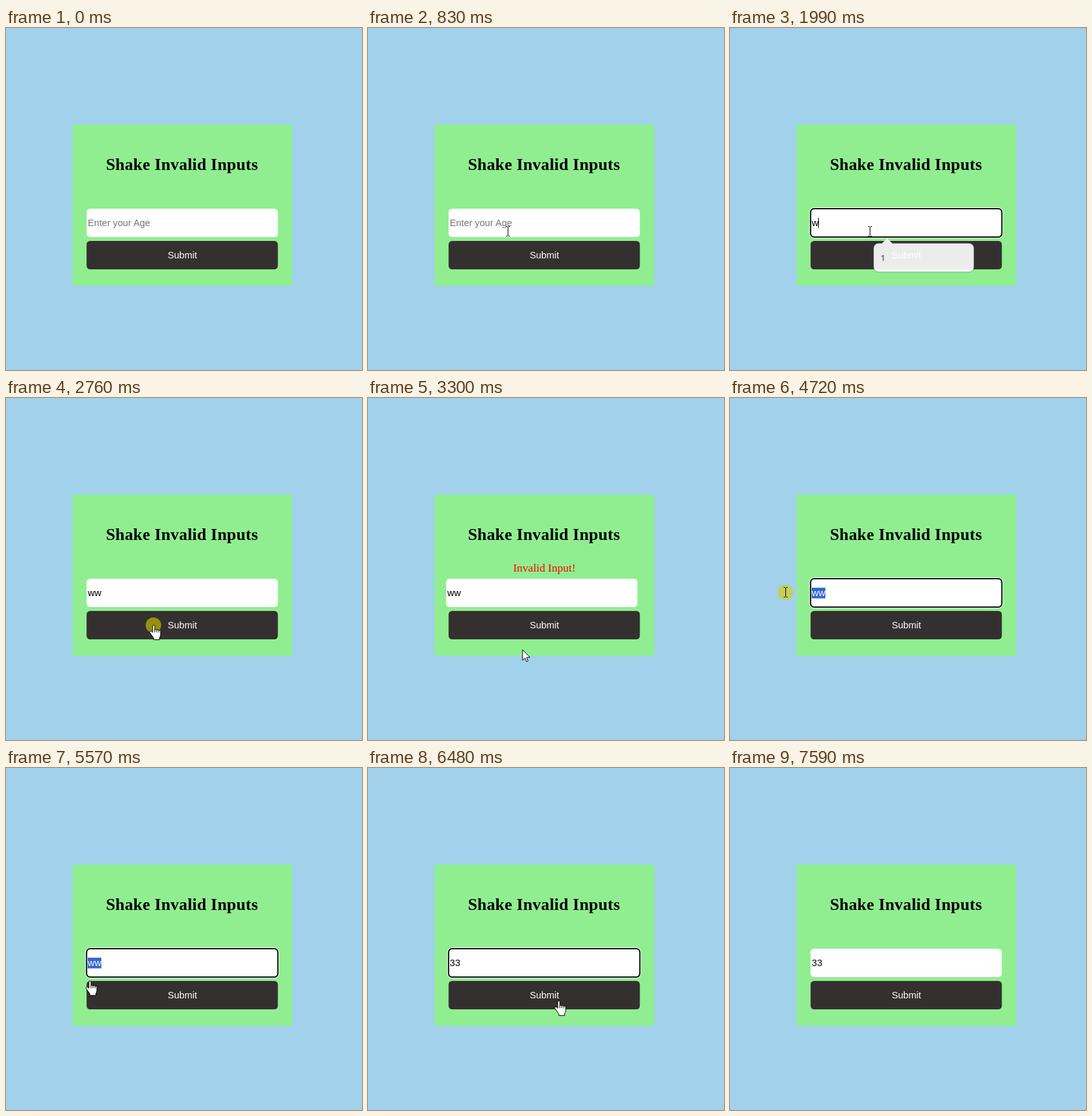
Recreate the animation shown at these times as an HTML page. Size 553 px wide and 530 px high, loop 8.97 s.

```html
<!DOCTYPE html>
<html lang="en">
<head>
<meta charset="utf-8">
<title>Shake Invalid Inputs</title>
<style>
  html, body { margin: 0; width: 100%; height: 100%; overflow: hidden; background: #a2d1eb; }
  svg { display: block; width: 553px; height: 530px; }
  text { font: 14.67px "Liberation Sans", Arial, sans-serif; white-space: pre; }
  .serif { font-family: "Liberation Serif", "Times New Roman", serif; text-anchor: middle; }
  .title { font-size: 26px; font-weight: bold; letter-spacing: .18px; }
  .error { font-size: 17.6px; fill: #f00; }
  .hint { font: 13px "Open Sans", "Noto Sans", sans-serif; fill: #222; }
  .pointer { fill: #fff; stroke: #000; stroke-linejoin: round; }
</style>
</head>
<body>
<svg viewBox="0 0 553 530">
  <rect width="553" height="530" fill="#a2d1eb"/>
  <rect x="103.5" y="149.5" width="341" height="250" fill="#90ee90"/>
  <text class="serif title" x="273.3" y="220">Shake Invalid Inputs</text>
  <text class="serif error" id="error" x="274" y="269">Invalid Input!</text>

  <g id="field">
    <rect x="125.2" y="280" width="297.1" height="44" rx="5.5" fill="#fff"/>
    <g id="ring" fill="none">
      <rect x="123.7" y="278.5" width="300.1" height="47" rx="6.5" stroke="#fff"/>
      <rect x="125.2" y="280" width="297.1" height="44" rx="5.5" stroke="#101010" stroke-width="2"/>
    </g>
    <rect id="selection" x="127" y="294" height="16.5" fill="#3367d1"/>
    <text id="value" x="127" y="307"></text>
    <rect id="caret" y="294" width="1" height="16"/>
  </g>

  <rect x="125.2" y="330" width="297.1" height="44" rx="5.5" fill="#353030"/>
  <text x="274" y="357" fill="#fff" text-anchor="middle">Submit</text>

  <g id="popup">
    <rect x="223" y="336" width="156" height="43.5" rx="8" opacity=".12"/>
    <path d="M230.5 334H236L244 326L252 334H371.5a7 7 0 0 1 7 7V370.5a7 7 0 0 1-7 7H230.5a7 7 0 0 1-7-7V341a7 7 0 0 1 7-7z"
      fill="#fff" stroke="#d4d4d4" stroke-width=".7"/>
    <text class="hint" x="234" y="361">1</text>
  </g>

  <g id="cursor">
    <circle id="press" r="12" fill="#d8ce00" opacity=".6"/>
    <path id="arrow" class="pointer" d="M0 0V16.5L3.8 13L6.3 18.7L8.7 17.6L6.2 12H11.6z"/>
    <g id="hand" class="pointer" transform="translate(0 -.7)">
      <path d="M-1.2 2.2a1.6 1.6 0 0 1 3.2 0V8.5a1.6 1.6 0 0 1 3.1 .4a1.6 1.6 0 0 1 3.1 .8a1.5 1.5 0 0 1 2.9 1V16Q11.1 18 9.5 20.3V23.3H.5V21Q-1 19-3 16L-5.6 12.4a1.7 1.7 0 0 1 2.5-2.2L-1.2 12z"/>
      <path d="M2 8.5V12M5.1 9V12M8.2 10V12" fill="none"/>
    </g>
    <path id="beam" d="M-2.5-7.5H-.5L.5-6.5L1.5-7.5H3.5M.5-6.5V6.5M-2.5 7.5H-.5L.5 6.5L1.5 7.5H3.5"
      fill="none" stroke="#000"/>
  </g>
</svg>
<script>
const LOOP = 8970, TICK = 76, BLINK = 500;
const el = {};
document.querySelectorAll('[id]').forEach(node => el[node.id] = node);

// Each move starts where the previous one ended; sag bends it downwards.
const move = (from, to, x, y, sag = 0) => ({ from, to, x, y, sag });
const moves = [
  move(70, 830, 217, 315),
  move(2300, 2540, 229, 352),
  move(3080, 3710, 276, 508),
  move(3710, 4090, 191, 315),
  move(4490, 4720, 86, 301),
  move(4870, 5570, 130, 330),
  move(5570, 6400, 296, 361, 70),
  move(6750, 7030, 354, 462),
  move(7030, 7590, 425, 506)
];

const within = (t, a, b) => t >= a && t < b;
const show = (node, on) => node.setAttribute('display', on ? 'inline' : 'none');
const set = (node, attrs) => {
  for (const key in attrs) node.setAttribute(key, attrs[key]);
};

function pointerAt(t) {
  let x = 417, y = 509;
  for (const m of moves) {
    if (t < m.from) break;
    const steps = Math.floor((t - m.from) / TICK) * TICK;
    const u = t >= m.to ? 1 : steps / (m.to - m.from);
    x += (m.x - x) * u;
    y += (m.y - y) * u + m.sag * Math.sin(Math.PI * u);
  }
  return [Math.round(x), Math.round(y)];
}

function drawField(t) {
  const focused = within(t, 1030, 2690) || within(t, 4490, 6590);
  const selected = within(t, 4570, 5890);
  const typed = t < 5890
    ? 'ww'.slice(0, (t >= 1910) + (t >= 2150))
    : '33'.slice(0, 1 + (t >= 5970));

  const shaking = within(t, 2920, 3400);
  const dx = shaking ? -4.6 * Math.sin((t - 2870) / 100 * Math.PI) : 0;
  set(el.field, { transform: `translate(${dx.toFixed(2)} 0)` });

  el.value.textContent = typed || 'Enter your Age';
  set(el.value, { fill: selected ? '#fff' : typed ? '#000' : '#757575' });
  const width = typed ? el.value.getComputedTextLength() : 0;
  set(el.selection, { width });
  set(el.caret, { x: Math.round(127 + width - 0.3) });

  const caretOn = [1030, 1910, 2150, 5890, 5970].some(key => within(t, key, key + BLINK));
  show(el.caret, caretOn);
  show(el.ring, focused);
  show(el.selection, selected);
  show(el.error, within(t, 2920, 3920));
}

function drawPopup(t) {
  show(el.popup, within(t, 1030, 2150));
  set(el.popup, { opacity: t < 1990 ? 1 : t < 2070 ? 0.91 : 0.45 });
}

function drawPointer(t) {
  const [x, y] = pointerAt(t);
  const dragging = within(t, 4490, 4870);
  const inside = within(x, 125, 423);
  const beam = dragging || (inside && within(y, 280, 324));
  const hand = !beam && inside && within(y, 330, 374);
  show(el.cursor, within(t, 70, 7590) && !within(t, 4330, 4490));
  set(el.cursor, { transform: `translate(${x} ${y})` });
  show(el.press, dragging || within(t, 2690, 2920) || within(t, 6590, 6750));
  show(el.beam, beam);
  show(el.hand, hand);
  show(el.arrow, !beam && !hand);
}

const start = performance.now();
function loop() {
  const t = (performance.now() - start) % LOOP;
  drawField(t);
  drawPopup(t);
  drawPointer(t);
  requestAnimationFrame(loop);
}
loop();
</script>
</body>
</html>
```
